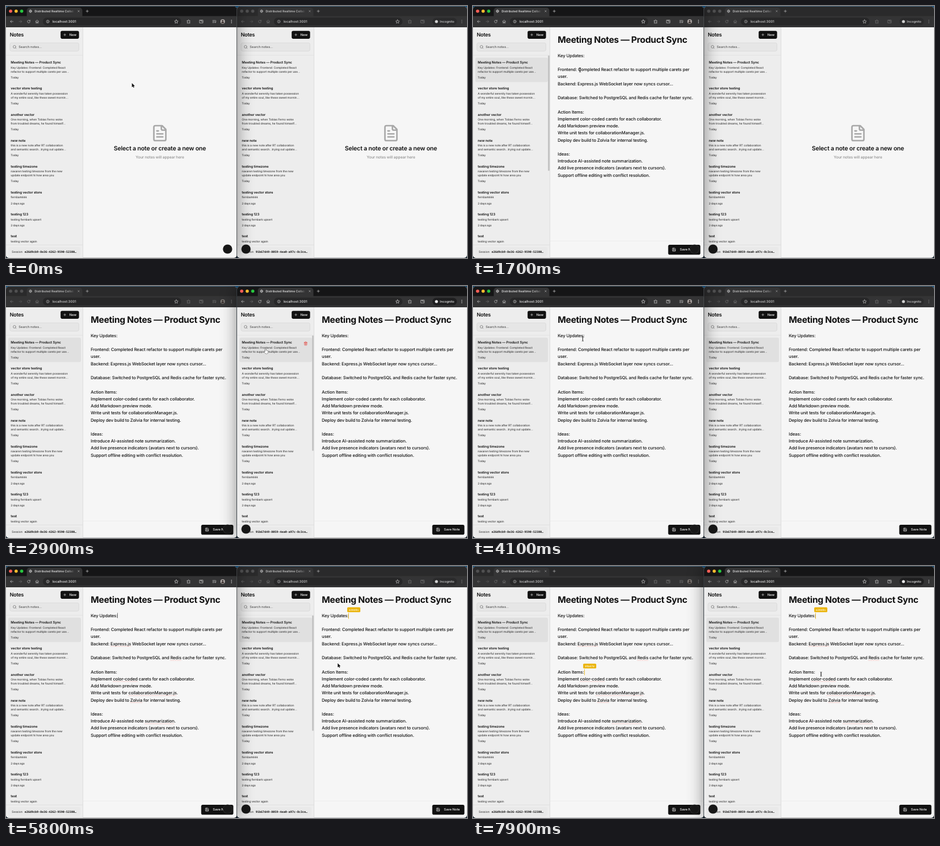
These frames come from a looping animation (800 by 438 pixels, 8000 ms). An HTML page with a canvas:

```html
<!DOCTYPE html>
<html lang="en">
<head>
<meta charset="utf-8">
<title>Shared notes</title>
<style>
html, body { margin: 0; width: 100%; height: 100%; overflow: hidden; background: #14222d; }
canvas { display: block; width: 800px; height: 438px; }
</style>
</head>
<body>
<canvas id="stage"></canvas>
<script>
const LOOP = 8000, W = 800, H = 438, SHIFT = 401, LINE = 12.23;
const cv = document.getElementById('stage');
const ctx = cv.getContext('2d');
const dpr = window.devicePixelRatio || 1;
cv.width = W * dpr;
cv.height = H * dpr;

const INK = '#111', BAR = '#343435';
const SANS = 'Inter, sans-serif';
const MONO = '"Noto Sans Mono", monospace';
const BODY = { size: 7.55, weight: 450, sp: -0.14 };

// Pointer path: time, x, y
const path = [
  [300, 218.5, 134], [1080, 55, 107], [1480, 55, 107], [2050, 446, 119.5],
  [2300, 446, 119.5], [2600, 450.5, 109], [3050, 450.5, 109], [3800, 190, 92],
  [4150, 190.5, 92], [4500, 197, 88], [5350, 197, 88], [5780, 575.5, 169],
  [5850, 576, 169], [6250, 600, 186], [6600, 600, 186], [6880, 604, 188]
];
const clicks = [1350, 2150, 2650, 3880, 4650, 6400];
const focusLog = [[-1000, 0], [2120, 1], [3880, 0], [6400, 1]];

const windows = [
  { x: 0, w: 400.5, open: 1430, typed: 4650, line: 0, id: 'e26d9cb9-8e36-4262-9590-52380…', badge: 384.5, star: 295.5 },
  { x: SHIFT, w: 399, open: 2700, typed: 6400, line: 8, id: '91b67d49-8059-4ea0-a97c-8c3ce…', badge: 15.5, star: 278.5 }
];

const notes = [
  ['Meeting Notes — Product Sync', 'Key Updates: Frontend: Completed React', 'refactor to support multiple carets per use…', 'Today'],
  ['vector store testing', 'A wonderful serenity has taken possession', 'of my entire soul, like these sweet mornin…', 'Today'],
  ['another vector', 'One morning, when Tobias Ferno woke', 'from troubled dreams, he found himself…', 'Today'],
  ['new note', 'this is a new note after RT collaboration', 'and semantic search...trying out update…', 'Today'],
  ['testing timezone', 'navaren testing timezone from the new', 'update endpoint hi how area you', 'Today'],
  ['testing vector store', 'fernbarkkkk', '', '2 days ago'],
  ['testing 123', 'testing fernbark upsert', '', '2 days ago'],
  ['test', 'testing vector again', '', '2 days ago']
];

const doc = [
  'Key Updates:', '',
  'Frontend: Completed React refactor to support multiple carets per',
  'user.',
  'Backend: Express.js WebSocket layer now syncs cursor...', '',
  'Database: Switched to PostgreSQL and Redis cache for faster sync.', '',
  'Action Items:',
  'Implement color-coded carets for each collaborator.',
  'Add Markdown preview mode.',
  'Write unit tests for collaborationManager.js.',
  'Deploy dev build to Zolvia for internal testing.', '',
  'Ideas:',
  'Introduce AI-assisted note summarization.',
  'Add live presence indicators (avatars next to cursors).',
  'Support offline editing with conflict resolution.'
];
const misspelt = ['Express.js', 'Redis', 'color-coded', 'collaborationManager.js', 'Zolvia', 'summarization'];

const icons = {
  file: 'M15 2H6a2 2 0 0 0-2 2v16a2 2 0 0 0 2 2h12a2 2 0 0 0 2-2V7ZM14 2v4a2 2 0 0 0 2 2h4M10 9H8M16 13H8M16 17H8',
  search: 'M19 11a8 8 0 1 1-16 0a8 8 0 1 1 16 0M21 21l-4.3-4.3',
  plus: 'M5 12h14M12 5v14',
  cross: 'M6 6l12 12M18 6L6 18',
  save: 'M15 3H5a2 2 0 0 0-2 2v14a2 2 0 0 0 2 2h14a2 2 0 0 0 2-2V8ZM17 21v-8H7v8M7 3v5h8',
  trash: 'M3 6h18M19 6v14a2 2 0 0 1-2 2H7a2 2 0 0 1-2-2V6M8 6V4a2 2 0 0 1 2-2h4a2 2 0 0 1 2 2v2M10 11v6M14 11v6',
  back: 'M20 12H4M11 5l-7 7l7 7',
  forward: 'M4 12h16M13 5l7 7l-7 7',
  reload: 'M20 12a8 8 0 1 1-2.5-5.8M20 3v5h-5',
  home: 'M3 11l9-8l9 8M5 10v11h5v-7h4v7h5V10',
  info: 'M21 12a9 9 0 1 1-18 0a9 9 0 1 1 18 0M12 11v6M12 7v1',
  globe: 'M21 12a9 9 0 1 1-18 0a9 9 0 1 1 18 0M3 12h18M12 3c-5 5-5 13 0 18M12 3c5 5 5 13 0 18',
  star: 'M12 2l3 6.6l7.2 .8l-5.4 4.9l1.5 7.1L12 17.8l-6.3 3.6l1.5-7.1L1.8 9.4L9 8.6Z',
  puzzle: 'M4 7h5V5a2.5 2.5 0 0 1 5 0v2h5v5h-1a2.5 2.5 0 0 0 0 5h1v4H4v-5h1a2.5 2.5 0 0 0 0-5H4Z',
  panel: 'M3 4h18v16H3ZM13 4v8h8M6 8h4',
  list: 'M3 6h14M3 12h9M3 18h7M20 6v10a2.5 2.5 0 1 1-2-2'
};
for (const k in icons) icons[k] = new Path2D(icons[k]);

const arrow = new Path2D('M0 0V7.2L1.7 5.7L2.8 8.1L4 7.6L2.9 5.2H5.2Z');
const hand = new Path2D('M-.7 .5Q0 -.4 .7 .5V3.2Q1.5 2.7 2 3.4Q2.8 3 3.2 3.7Q4.2 3.5 4.2 4.5V6Q4.2 8.5 2.5 8.7H.6Q-.8 7.8 -2.4 5.3Q-2.4 4.2 -.7 5.3Z');

function setFont(size, weight, o = {}) {
  ctx.font = `${weight} ${size * 10}px ${o.mono ? MONO : SANS}`;
  ctx.letterSpacing = (o.sp || 0) * 10 + 'px';
  ctx.textAlign = o.align || 'left';
  ctx.textRendering = 'geometricPrecision';
}

// y is the middle of the capitals; large type scaled down keeps spacing exact
function text(s, x, y, size, weight, color, o) {
  ctx.save();
  ctx.translate(x, y + size * 0.3635);
  ctx.scale(0.1, 0.1);
  setFont(size, weight, o);
  ctx.fillStyle = color;
  ctx.fillText(s, 0, 0);
  ctx.restore();
}

function bodyWidth(s) {
  setFont(BODY.size, BODY.weight, BODY);
  return ctx.measureText(s).width / 10;
}

function rect(x, y, w, h, color, r = 0, border) {
  ctx.beginPath();
  ctx.roundRect(x, y, w, h, r);
  ctx.fillStyle = color;
  ctx.fill();
  if (border) {
    ctx.strokeStyle = border;
    ctx.lineWidth = 0.6;
    ctx.stroke();
  }
}

function dot(x, y, r, color) {
  ctx.beginPath();
  ctx.arc(x, y, r, 0, 7);
  ctx.fillStyle = color;
  ctx.fill();
}

function icon(name, x, y, size, color, weight = 2) {
  ctx.save();
  ctx.translate(x - size / 2, y - size / 2);
  ctx.scale(size / 24, size / 24);
  ctx.strokeStyle = color;
  ctx.lineWidth = weight;
  ctx.lineCap = ctx.lineJoin = 'round';
  ctx.stroke(icons[name]);
  ctx.restore();
}

function pointer(t) {
  let a = path[0];
  for (const b of path) {
    if (t < b[0]) {
      const span = b[0] - a[0];
      const k = span ? Math.max(0, (t - a[0]) / span) : 1;
      const e = k * k * (3 - 2 * k);
      return { x: a[1] + (b[1] - a[1]) * e, y: a[2] + (b[2] - a[2]) * e };
    }
    a = b;
  }
  return { x: a[1], y: a[2] };
}

function inList(win, p) {
  const x = p.x - win.x;
  return x > 0 && x < 133 && p.y > 86 && p.y < 414;
}

function look(t) {
  const [since, active] = focusLog.filter(f => f[0] <= t).pop();
  const p = pointer(t), win = windows[active], lx = p.x - win.x;
  const awake = t - since > 150;
  let kind = 'arrow';
  if (awake && inList(win, p)) kind = 'hand';
  else if (awake && t >= win.open && lx > 140 && lx < win.w && p.y > 76 && p.y < 405) kind = 'beam';
  return { active, p, kind };
}

function chrome(win, on) {
  const fg = on ? '#d8d8d8' : '#7c7c7c', dim = on ? '#777' : '#5e5e5e';
  const bright = on ? '#ededed' : '#d2d2d2';
  const right = win.x > 0;
  rect(0, 0, win.w, 19, on ? '#151516' : '#2a2a2b');
  rect(36, 3, 96.5, 17, BAR, [5, 5, 0, 0]);
  rect(0, 17.5, win.w, 19.5, BAR);
  ['#ff5f57', '#febc2e', '#28c840'].forEach((c, i) => dot(8 + i * 9.6, 9, 2.8, on ? c : '#505051'));
  icon('globe', 42.5, 9, 6, bright);
  const fade = ctx.createLinearGradient(0, 0, 1180, 0);
  fade.addColorStop(0.85, bright);
  fade.addColorStop(1, BAR);
  ctx.save();
  ctx.beginPath();
  ctx.rect(48, 0, 70, 18);
  ctx.clip();
  ctx.translate(49.5, 0);
  const local = ctx.createLinearGradient(570, 0, 690, 0);
  local.addColorStop(0, bright);
  local.addColorStop(1, BAR);
  text('Distributed Realtime Collabo', 0, 9, 5.3, 450, local);
  ctx.restore();
  icon('cross', 126, 9, 5, bright);
  icon('plus', 141, 9, 7, bright);

  icon('back', 10, 27, 7, fg);
  icon('forward', 25, 27, 7, dim);
  icon('reload', 39.5, 27, 7, fg);
  icon('home', 54, 27, 7, fg);
  rect(64, 20.3, win.star - 55.5, 13.4, '#272728', 6.7);
  icon('info', 72.5, 27, 6.5, bright);
  text('localhost:3001', 80.5, 27, 5.9, 450, bright);
  icon('star', win.star, 27, 7.5, bright);
  icon('puzzle', win.star + 21.5, 27, 7.5, fg);
  icon('panel', win.star + 43.5, 27, 7.5, fg);
  if (right) {
    rect(339, 20.5, 42.5, 13, on ? '#1f1f20' : '#2b2b2c', 6.5);
    dot(346, 27, 2.6, bright);
    text('Incognito', 352, 27, 5.6, 450, bright);
  } else {
    icon('list', 361.5, 27, 7.5, fg);
    dot(376, 27, 4, on ? '#a9a3a0' : '#77736f');
    dot(376, 25.8, 1.4, '#38302e');
    rect(373.7, 27.4, 4.6, 2.6, '#38302e', [2, 2, 0.5, 0.5]);
  }
  for (let i = -1; i < 2; i++) dot(right ? 390 : 391.3, 27 + i * 2.3, 0.7, fg);
}

function sidebar(win, t, hover) {
  rect(0, 37, 133.5, 401, '#ededed');
  text('Notes', 6.6, 50, 9, 600, INK, { sp: -0.35 });
  rect(94.7, 43.2, 32, 13.7, '#111', 2.8);
  icon('plus', 102, 50, 6.5, '#fff');
  text('New', 110, 50, 5.7, 500, '#fff');
  rect(6.8, 64, 119.7, 14.4, '#e6e6e6', 2.8, '#d2d2d2');
  icon('search', 15, 71.2, 7, '#555');
  text('Search notes...', 22, 71.2, 5.65, 450, '#555', { sp: -0.03 });
  rect(0, 85, 133, 0.6, '#d9d9d9');

  ctx.save();
  ctx.beginPath();
  ctx.rect(0, 86, 134, 329);
  ctx.clip();
  if (t >= win.open) rect(4, 89.8, 126, 42.4, '#e0e0e0', 3);
  else if (hover) rect(4, 89.8, 126, 42.4, '#e4e4e4', 3);
  const small = { sp: -0.07 };
  let y = 98.2;
  for (const [title, one, two, when] of notes) {
    text(title, 8.3, y, 5.95, 600, INK, { sp: -0.09 });
    text(one, 8.3, y + 9, 4.95, 450, '#3c3c3c', small);
    if (two) text(two, 8.3, y + 15.7, 4.95, 450, '#3c3c3c', small);
    text(when, 8.3, y + (two ? 26 : 19.2), 4.75, 450, '#333', small);
    y += two ? 45.1 : 38.3;
  }
  if (hover) icon('trash', 119, 100, 7, '#e5322d', 2.2);
  const seen = [0, 150, 300, 450].some(d => inList(win, pointer(Math.max(0, t - d))));
  if (seen) rect(130.2, 86, 2.6, 200.5, '#c0c0c0', 1.3);
  ctx.restore();

  rect(133, 37, 0.7, 401, '#d6d6d6');
  rect(0, 414.8, 133, 0.6, '#d9d9d9');
  rect(4, 419, 125, 15.5, '#e9e9e9', 3);
  text('Session', 10, 426.8, 5, 450, '#444');
  text(win.id, 32.3, 426.8, 5, 600, INK, { mono: true });
}

function tag(label, line) {
  const y = 86 + line * LINE;
  rect(193.1, y - 4.5, 0.8, 10.5, '#eab308');
  rect(191.2, y - 14.2, 22.6, 8.4, '#eab308', 1.5);
  text(label, 202.5, y - 10, 4.7, 600, '#fff8e0', { align: 'center' });
}

function editor(win, other, t, on) {
  text('Meeting Notes — Product Sync', 147, 58.6, 15.5, 700, INK, { sp: -0.37 });
  doc.forEach((s, i) => {
    const y = 86 + i * LINE;
    text(s, 147, y, BODY.size, BODY.weight, INK, BODY);
    if (t < win.typed) return;
    for (const word of misspelt) {
      const at = s.indexOf(word);
      if (at < 0) continue;
      const x = 147 + bodyWidth(s.slice(0, at));
      ctx.setLineDash([1, 0.6]);
      ctx.strokeStyle = '#ee8d87';
      ctx.lineWidth = 0.6;
      ctx.beginPath();
      ctx.moveTo(x, y + 4.7);
      ctx.lineTo(x + bodyWidth(word), y + 4.7);
      ctx.stroke();
      ctx.setLineDash([]);
    }
  });
  const lit = Math.floor((t - win.typed) / 500) % 2 === 0;
  if (on && t >= win.typed && lit) rect(193.2, 81.5 + win.line * LINE, 0.6, 9, '#222');
  if (t >= other.typed + 40) tag(other.id.slice(0, 6), other.line);

  rect(133.7, 408, win.w, 0.6, '#e6e6e6');
  rect(338.7, 414.9, 55.8, 17.3, '#111', 2.8);
  icon('save', 348.8, 423.4, 7, '#fff');
  text('Save Note', 359, 423.4, 5.65, 500, '#fff');
}

function blank() {
  icon('file', 267, 221, 31.2, '#a8a8a8', 2);
  text('Select a note or create a new one', 267, 247.6, 10.4, 600, INK, { sp: -0.2, align: 'center' });
  text('Your notes will appear here', 267, 262.8, 6.55, 450, '#8c8c8c', { sp: -0.05, align: 'center' });
}

function drawWindow(i, t, view) {
  const win = windows[i], on = view.active === i;
  ctx.save();
  ctx.translate(win.x, 0);
  if (on) {
    ctx.save();
    ctx.shadowColor = 'rgba(0,0,0,.46)';
    ctx.shadowBlur = 29 * dpr;
    rect(0, 0.8, win.w, 437.2, '#222', 5);
    ctx.restore();
  }
  ctx.beginPath();
  ctx.roundRect(0, 0.8, win.w, 437, 5);
  ctx.clip();
  rect(0, 0, win.w, H, '#f6f6f6');
  chrome(win, on);
  sidebar(win, t, on && view.kind === 'hand' && view.p.y < 132);
  if (t >= win.open) editor(win, windows[1 - i], t, on);
  else blank();
  dot(win.badge, 422.5, 8.1, '#333');
  dot(win.badge, 422.5, 7.6, '#171717');
  ctx.restore();
}

function drawPointer(t, { p, kind }) {
  if (clicks.some(c => t > c - 50 && t < c + 190)) {
    ctx.beginPath();
    ctx.arc(p.x + 0.7, p.y + 1, 16.8, 0, 7);
    ctx.strokeStyle = '#222';
    ctx.lineWidth = 0.9;
    ctx.stroke();
  }
  ctx.save();
  ctx.translate(p.x, p.y);
  ctx.lineJoin = 'round';
  if (kind === 'beam') {
    ctx.beginPath();
    for (const side of [-1.5, 1.5]) {
      ctx.moveTo(side, -3.8);
      ctx.quadraticCurveTo(0, -3.8, 0, -2.6);
      ctx.lineTo(0, 2.6);
      ctx.quadraticCurveTo(0, 3.8, side, 3.8);
    }
    ctx.strokeStyle = '#222';
    ctx.lineWidth = 0.8;
    ctx.stroke();
  } else {
    const isHand = kind === 'hand', shape = isHand ? hand : arrow;
    ctx.strokeStyle = isHand ? '#222' : '#fff';
    ctx.fillStyle = isHand ? '#fff' : '#111';
    ctx.lineWidth = isHand ? 0.9 : 1.2;
    ctx.stroke(shape);
    ctx.fill(shape);
  }
  ctx.restore();
}

function draw(t) {
  ctx.setTransform(dpr, 0, 0, dpr, 0, 0);
  rect(0, 0, W, H, '#14222d');
  rect(0, 0, W, 3, '#1b5480');
  const view = look(t);
  drawWindow(1 - view.active, t, view);
  drawWindow(view.active, t, view);
  drawPointer(t, view);
}

const start = performance.now();
function tick() {
  draw((performance.now() - start) % LOOP);
  requestAnimationFrame(tick);
}
tick();
</script>
</body>
</html>
```
